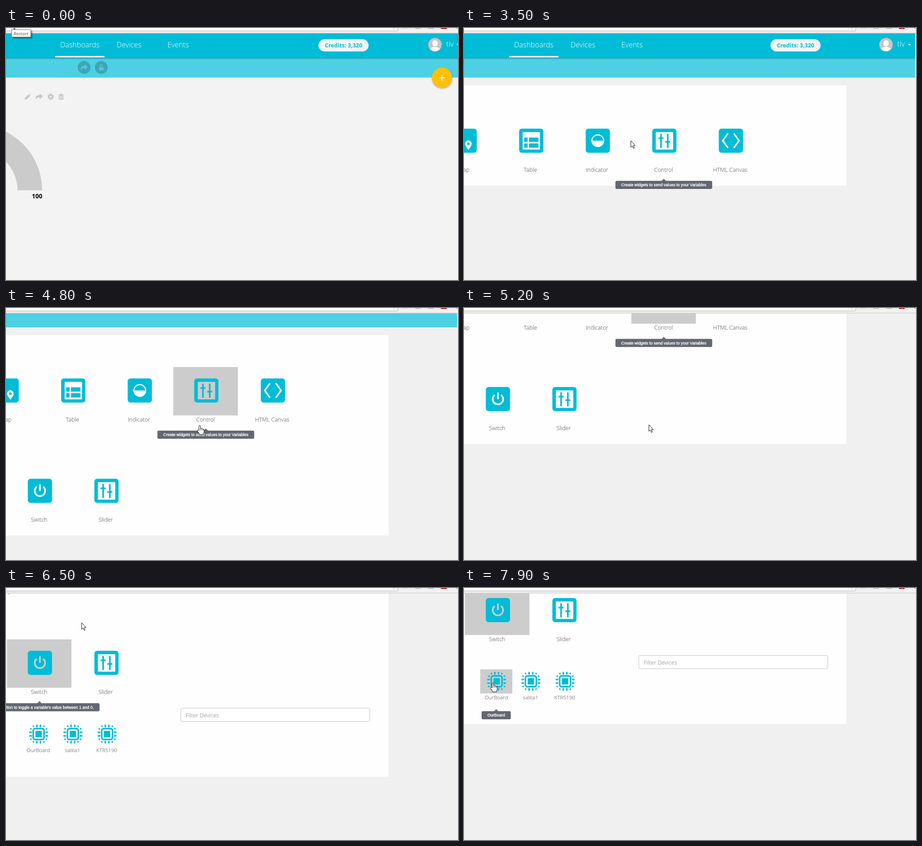
Recreate the animation shown at these times as an HTML page. Size 1001 by 559 pixels, loop 8 s.

```html
<!DOCTYPE html>
<html lang="en">
<head>
<meta charset="utf-8">
<title>Dashboard widget demo</title>
<style>
html, body { margin: 0; width: 100%; height: 100%; overflow: hidden; background: #f3f3f3; }
svg { display: block; width: 1001px; height: 559px; }
text { font-family: "Open Sans", sans-serif; font-weight: 300; }
.nav { font-size: 16.07px; fill: #fff; }
.bold { font-weight: 700; }
.label { font-size: 12.5px; fill: #444; text-anchor: middle; }
.small { font-size: 11.6px; }
.tip rect, .tip path { fill: #535762; }
.tip g { opacity: .9; }
.tip text { font: 8.93px "Liberation Sans", Arial, sans-serif; fill: #fff; stroke: #fff; stroke-width: .35px; text-anchor: middle; }
.cell { color: #fff; }
.cell.on { color: #ccc; }
.cell .back { fill: none; }
.cell.on .back { fill: #ccc; }
</style>
</head>
<body>
<svg id="stage" viewBox="0 0 1001 559" xmlns="http://www.w3.org/2000/svg"></svg>
<script>
const LOOP = 8000, STEP = 100;
const CYAN = '#00bcd7';
const $ = id => document.getElementById(id);
const rect = (x, y, w, h, fill, r = 0) =>
  `<rect x="${x}" y="${y}" width="${w}" height="${h}" rx="${r}" fill="${fill}"/>`;
const at = (x, y, body, extra = '') => `<g transform="translate(${x} ${y})" ${extra}>${body}</g>`;
const text = (x, y, s, cls, extra = '') => `<text x="${x}" y="${y}" class="${cls}" ${extra}>${s}</text>`;

const SHARE = '<path d="M-7.5 6.5C-9-2-4-3.500 1-3.500V-7.500L8.500-1 1 5.500V1.500C-4 1.200-6.500 2.500-7.500 6.500Z"/>';
const LOCK = '<path d="M-5-0.500H5V6.500H-5ZM-3.200 0V-3.500A3.200 3.200 0 0 1 3.200-3.500V-2.500H1.600V-3.500A1.600 1.600 0 0 0-1.600-3.500V0Z"/>';
const PENCIL = '<path d="M-6.500 6.500V3L2-5.500 5.500-2-3 6.500ZM3-6.300 4.200-7.200 7.200-4.200 6.300-3Z"/>';
const GEAR = '<circle r="4" fill="none" stroke="#c8c8c8" stroke-width="3.600"/>' +
  '<circle r="6" fill="none" stroke="#c8c8c8" stroke-width="2.400" stroke-dasharray="2.700 2.012"/>';
const TRASH = '<path fill-rule="evenodd" d="M-6-5H-2.500L-1.500-7H1.500L2.500-5H6V-3.700H5V6.500H-5V-3.700H-6ZM-3-2.500V4.500H-2V-2.500ZM-.5-2.500V4.500H.5V-2.500ZM2-2.500V4.500H3V-2.500Z"/>';

// White parts use currentColor so they follow the cell background.
const tile = body => rect(-26.8, -26.8, 53.6, 53.6, CYAN, 6) + body;
const sheet = rect(-19, -19.2, 38.5, 38.8, 'currentColor');
const fader = (x, y) => rect(x - 1.8, -15, 3.6, 31, CYAN) + rect(x - 5.5, y - 1.8, 11, 3.6, CYAN);
const stroke = (d, w) => `<path d="${d}" fill="none" stroke="currentColor" stroke-width="${w}"/>`;
const ICON = {
  map: tile('<path fill="currentColor" fill-rule="evenodd" d="M8.200 20.500C4 14.500 1 10.500 1 6.500A7.200 7.200 0 0 1 15.400 6.500C15.400 10.500 12.400 14.500 8.200 20.500ZM8.200 4A2.900 2.900 0 1 0 8.200 9.800 2.900 2.900 0 1 0 8.200 4Z"/>'),
  table: tile(sheet + [-7, 6].map(y => rect(-15.5, y, 7.5, 9.5, CYAN) + rect(-5, y, 21, 9.5, CYAN)).join('')),
  gauge: tile(stroke('M-13 0A13 13 0 0 1 13 0A13 13 0 0 1-13 0', 2.4) +
    '<path d="M-13 0A13 13 0 0 0 13 0Z" fill="currentColor"/>'),
  faders: tile(sheet + fader(-7.5, -5.5) + fader(7.5, 2.5)),
  code: tile(stroke('M-6.500-16-18 0-6.500 16M6.500-16 18 0 6.500 16', 3.6)),
  power: tile(stroke('M-7-9A11.500 11.500 0 1 0 7-9M0-14.500V0', 3.7))
};
const chipPins = [0, 90, 180, 270].map(a => `<g transform="rotate(${a})">` +
  '<path d="M-4-16.500V-19.500M4-16.500V-19.500M-11.500-17V-17.500M11.500-17V-17.500"/></g>').join('');
ICON.chip = rect(-7, -7, 14, 14, CYAN, 1) +
  `<g fill="none" stroke="${CYAN}" stroke-width="3.4" stroke-linecap="round">` +
  `<rect x="-12" y="-12" width="24" height="24" rx="4"/>${chipPins}</g>`;

// x is the cell centre, y its top; "show" and "pick" are times in ms.
const cells = [];
const row = (x0, gap, y, show, items) => items.forEach(([name, icon, pick], i) =>
  cells.push({ x: x0 + gap * i, y, w: 143, h: 107.300, dy: 52, base: 120.500, show, pick, name, icon, cls: 'label' }));
row(-0.2, 147.4, 198, 2300, [['Map', 'map'], ['Table', 'table'], ['Indicator', 'gauge'],
  ['Control', 'faders', 4600], ['HTML Canvas', 'code']]);
row(73.4, 147.4, 420.5, 4600, [['Switch', 'power', 6300], ['Slider', 'faders']]);
['OurBoard', 'salita1', 'KTR5190'].forEach((name, i) => cells.push({
  x: 71.5 + 75.8 * i, y: 604, w: 71, h: 53.5, dy: 26.5, base: 66, show: 6300, name, icon: 'chip', cls: 'label small' }));

const drawCell = (c, i) => `<g id="cell${i}" class="cell">` +
  `<rect class="back" x="${c.x - c.w / 2}" y="${c.y}" width="${c.w}" height="${c.h}"/>` +
  at(c.x + (c.icon === 'chip' ? 0.8 : 1.7), c.y + c.dy, ICON[c.icon]) +
  text(c.x, c.y + c.base, c.name, c.cls) + '</g>';

const tip = (id, x, y, s) => at(x, y,
  `<g><rect y="0" height="18" rx="3"/><path d="M-5 0.200 0-4.500 5 0.200Z"/></g>` + text(0, 12.2, s, ''),
  `id="${id}" class="tip"`);

// The page scrollbar shifts each header part by its own amount.
const header = (width, navX, pillX, userX) =>
  rect(0, 66, width, 44, '#4dd0e3') +
  rect(0, 66, width, 4, 'url(#shade)') +
  rect(0, 12, width, 54, CYAN) +
  text(navX, 43, 'Dashboards', 'nav') + text(navX + 125, 43, 'Devices', 'nav') + text(navX + 237.5, 43, 'Events', 'nav') +
  rect(navX - 11, 62, 109, 3.2, '#f8f8f8') +
  rect(pillX, 25, 111, 27, '#f5f5f5', 13.5) +
  text(pillX + 55.5, 43, 'Credits: 3,320', 'bold', `font-size="12.5" fill="${CYAN}" text-anchor="middle"`) +
  at(userX, 37, '<circle r="15.500" fill="#c3c8cb"/>' +
    '<g clip-path="url(#round)" fill="#fff"><ellipse cy="-3" rx="6" ry="7"/><path d="M-12 16C-12 7-6 6-3 5H3C6 6 12 7 12 16Z"/></g>' +
    '<circle r="15.300" fill="none" stroke="#7f989e" stroke-width="1"/>') +
  text(userX + 25, 41, 'tiv', 'nav') +
  `<path d="M${userX + 48} 35.500h7.500l-3.750 3.800z" fill="#fff"/>`;

const chrome = rect(0, 0, 1001, 12, '#f1f1f1') + rect(-5, -10, 872.5, 16.5, '#fff') +
  '<path d="M0 6.500H865.500Q867.500 6.500 867.500 4.500V0" fill="none" stroke="#a9a9a9"/>' +
  rect(0, 10.6, 1001, 1.2, '#cfc4c4') +
  '<path d="M851 0l2-1M857 0l3 1" stroke="#999"/>' +
  rect(878, 0, 12, 1, '#ccc') + rect(906, -3, 13, 4.5, '#b5b5b5', 1) +
  rect(934, -3, 14, 4.5, '#b5b5b5', 1) + rect(963, -3, 13, 5, '#b0121b', 1) +
  '<circle cx="998.500" cy="0" r="1.300" fill="#666"/>';

const firstPage = rect(0, 12, 1001, 547, '#f3f3f3') + header(1001, 120, 692, 950) +
  [[173, SHARE], [211, LOCK]].map(([x, d]) =>
    at(x, 87.5, `<circle r="14.300" fill="#3ea6b6"/><g fill="#4dc8da">${d}</g>`)).join('') +
  [[48, PENCIL], [73.5, SHARE], [99, GEAR], [122, TRASH]].map(([x, d]) => at(x, 152.5, d, 'fill="#c8c8c8"')).join('') +
  '<path d="M-65.600 214.400A145.600 145.600 0 0 1 80 360H25.500A91.100 91.100 0 0 0-65.600 268.900Z" fill="#cbcbcb"/>' +
  text(80.3, 378, '100', 'bold', 'font-size="13.4" text-anchor="end"') +
  '<circle cx="966" cy="112" r="22.800" fill="#000" opacity=".25" filter="url(#blur)"/>' +
  '<circle cx="965.500" cy="110" r="22.500" fill="#ffc107"/>' +
  '<path d="M959 110.500H972M965.500 104V117" stroke="#fff" stroke-width="1.400"/>' +
  '<g id="createTip" class="tip"><g><rect x="852" y="101" width="84" height="18" rx="3"/><path d="M935.800 105 942.500 110 935.800 115Z"/></g>' +
  text(894, 112.8, 'Create Widget', '') + '</g>';

const secondPage = rect(0, 12, 1001, 547, '#f0f0f0') +
  `<g id="scroller">${header(999, 111, 678.7, 934.6)}<g id="panel">` +
  '<rect id="sheet" x="0" y="127" width="847" fill="#fefefe"/>' + cells.map(drawCell).join('') +
  '<g id="filter"><rect x="387.200" y="573" width="418.500" height="29.500" rx="3" fill="#fff" stroke="#c2c2c2"/>' +
  text(398, 593, 'Filter Devices', '', 'font-size="12.5" fill="#777"') + '</g>' +
  tip('controlTip', 442.5, 339, 'Create widgets to send values to your Variables') +
  tip('switchTip', 74, 562, "Create a button to toggle a variable's value between 1 and 0.") +
  tip('deviceTip', 71.3, 696.7, 'OurBoard') + '</g></g>';

const restart = '<g id="restart">' + rect(15, 6, 43, 17, '#000', 1).replace('/>', ' opacity=".45" filter="url(#blur)"/>') +
  '<rect x="12.500" y="3.500" width="42.500" height="16.500" fill="#fafafa" stroke="#767676"/>' +
  text(17, 15.5, 'Restart', '', 'style="font-weight:400" font-size="9.75" fill="#555"') + '</g>';

const pointer = '<g id="cursor"><path id="arrow" d="M.5 0V14.500L3.700 11.600 6 17 8.200 16 5.900 10.800H10.200Z" fill="#fff" stroke="#111"/>' +
  '<g id="hand" stroke="#111" stroke-linejoin="round"><path d="M-1.700 12.500V2Q0-.8 1.700 2V7.500Q3.500 6.300 4.600 8.300 6.300 7.300 7.300 9.200 9.600 8.500 9.600 11V15Q9.300 17.500 8 19V21.500H-.8V20Q-3-17 -1 19.500L-5 13.500Q-5.500 10.500-3 11.200Z" fill="#fff"/>' +
  '<path d="M1.700 7.500V12M4.600 8.500V12M7.300 9.500V12.500" stroke-width=".8"/></g></g>';

$('stage').innerHTML = '<defs><clipPath id="view"><rect y="12" width="1001" height="547"/></clipPath>' +
  '<clipPath id="round"><circle r="15"/></clipPath><filter id="blur"><feGaussianBlur stdDeviation="1.600"/></filter>' +
  '<linearGradient id="shade" x2="0" y2="1"><stop stop-color="#147f90" stop-opacity=".65"/><stop offset="1" stop-color="#147f90" stop-opacity="0"/></linearGradient></defs>' +
  `<g clip-path="url(#view)"><g id="first">${firstPage}</g><g id="second">${secondPage}</g></g>` + chrome + restart + pointer;
$('hand').firstChild.setAttribute('d',
  'M-1.700 12.500V2Q0-.8 1.700 2V7.500Q3.500 6.300 4.600 8.300 6.300 7.300 7.300 9.200 9.600 8.500 9.600 11V15Q9.300 17.500 8 19V21.500H-.8V19.500L-5 13.500Q-5.500 10.500-3 11.200Z');

for (const g of document.querySelectorAll('#panel .tip')) {
  const w = g.querySelector('text').getComputedTextLength() + 26;
  const box = g.querySelector('rect');
  box.setAttribute('x', -w / 2);
  box.setAttribute('width', w);
}

const path = [[200, 12, -14], [300, 50, 2], [600, 380, 75], [1000, 738, 122], [1400, 905, 116], [1700, 955, 110],
  [1800, 956, 109], [2300, 956, 109], [2700, 753, 135], [2800, 753, 135], [3100, 590, 195], [3300, 450, 245],
  [3500, 369, 250], [3700, 385, 258], [4000, 429, 259.5], [4800, 429, 259.5], [5200, 409, 259], [5400, 240, 240],
  [5500, 140, 215], [5600, 105, 203], [5700, 105, 203], [6000, 75, 207], [6200, 75, 207], [6500, 167, 77],
  [6800, 190, -6], [7200, 190, -6], [7500, 150, 95], [7800, 64, 209]];
const scroll = [[4600, 0], [4700, 8], [4800, 67], [5000, 200], [5100, 252], [5200, 270.5], [6300, 270.5],
  [6400, 276], [6500, 306.5], [6700, 405], [6800, 423.5]];

function track(keys, t, i = 1) {
  const k = keys.findIndex(key => key[0] > t);
  if (k === 0) return keys[0][i];
  if (k < 0) return keys[keys.length - 1][i];
  const a = keys[k - 1], b = keys[k];
  return a[i] + (b[i] - a[i]) * (t - a[0]) / (b[0] - a[0]);
}

const show = (id, on) => $(id).setAttribute('display', on ? 'inline' : 'none');
const within = (t, a, b) => t >= a && t < b;

function render(time) {
  const t = Math.floor(time / STEP) * STEP;
  const x = track(path, t), y = track(path, t, 2), s = track(scroll, t);
  const open = t >= 2300;
  let hand = !open && Math.hypot(x - 965.5, y - 110) < 22.5;

  show('first', !open);
  show('second', open);
  show('restart', t < 300);
  show('createTip', within(t, 1700, 2200));
  show('controlTip', within(t, 3300, 3600) || within(t, 3900, 5300));
  show('switchTip', within(t, 5900, 6600));
  show('deviceTip', t >= 7800);
  show('filter', t >= 6300);

  $('scroller').setAttribute('transform', `translate(0 ${-s})`);
  $('panel').setAttribute('opacity', Math.min(1, Math.max(0, (t - 2200) / 500)));
  $('sheet').setAttribute('height', (t < 4600 ? 350 : t < 6300 ? 572 : 725) - 127);

  cells.forEach((c, i) => {
    const live = t >= c.show, top = c.y - s;
    const over = live && Math.abs(x - c.x) < c.w / 2 && y >= Math.max(12, top);
    show('cell' + i, live);
    $('cell' + i).classList.toggle('on', over && y < top + c.h || t >= c.pick);
    hand = hand || over && y < top + c.h + 30;
  });

  show('hand', hand);
  show('arrow', !hand);
  $('cursor').setAttribute('transform', `translate(${x} ${y})`);
}

function loop(now) {
  render(now % LOOP);
  requestAnimationFrame(loop);
}
render(0);
requestAnimationFrame(loop);
</script>
</body>
</html>
```
